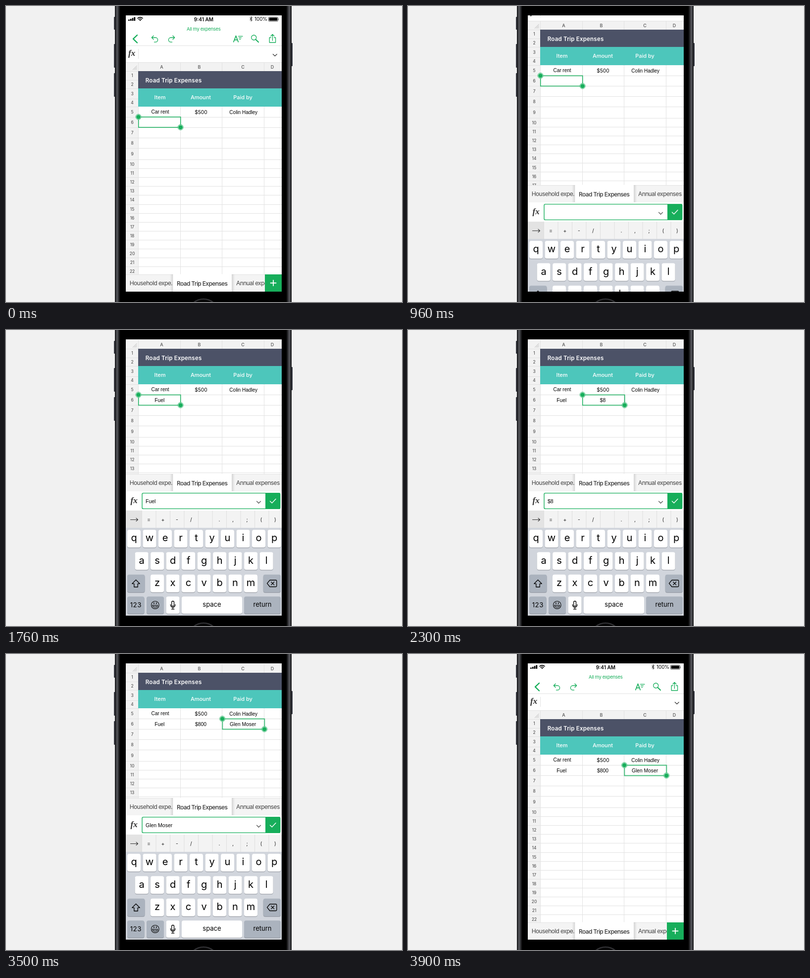
An HTML page for the animation above (4.48 s loop, 800 px wide and 600 px high).

```html
<!DOCTYPE html>
<html lang="en">
<head>
<meta charset="utf-8">
<title>Road Trip Expenses</title>
<style>
html, body { margin: 0; width: 100%; height: 100%; overflow: hidden; background: #f1f1f1; }
svg { display: block; width: 800px; height: 600px; font-family: Inter, sans-serif; }
.sans { font-family: "Liberation Sans", Arial, sans-serif; }
.fx { font: italic bold 17px "Liberation Serif", serif; fill: #333; }
.mid { text-anchor: middle; }
.line { fill: none; stroke-linecap: round; stroke-linejoin: round; }
.green { stroke: #17ae5b; }
.grid { stroke: #e2e2e2; }

/* One loop is 4480 ms; the curve is a plain smoothstep. */
#sheet, #keyboard, #bar, #tabs, #selY, #selX, #plus, #tap {
  animation: 4480ms cubic-bezier(.3333, 0, .6667, 1) infinite;
}
#sheet { animation-name: sheet; }
#selY { animation-name: selY; }
#selX { animation-name: selX; }
#tabs { animation-name: tabs; }
#keyboard { animation-name: keyboard; }
#bar { animation-name: bar; }
#plus { animation-name: plus; }
#tap { animation-name: tap; transform-box: fill-box; transform-origin: center; }

@keyframes sheet {
  0%, 16.07% { transform: translateY(0); }
  22.81%, 80.76% { transform: translateY(-94px); }
  87.05%, 100% { transform: translateY(0); }
}
@keyframes selY {
  0%, 16.07% { transform: translateY(0); }
  22.81%, 80.11% { transform: translateY(-93.5px); }
  86.81%, 100% { transform: translateY(.5px); }
}
@keyframes selX {
  0%, 40.63% { transform: translateX(0); }
  43.84%, 61.16% { transform: translateX(85px); }
  64.38%, 100% { transform: translateX(169.5px); }
}
@keyframes tabs {
  0%, 16.52% { transform: translateY(252px); }
  24.11%, 79.33% { transform: translateY(0); }
  86.03%, 100% { transform: translateY(252px); }
}
@keyframes keyboard {
  0%, 16.52% { transform: translateY(252px); }
  24.11%, 79.75% { transform: translateY(0); }
  86.45%, 100% { transform: translateY(252px); }
}
@keyframes bar {
  0%, 79.66% { transform: translateY(0); }
  86.36%, 100% { transform: translateY(252px); }
}
@keyframes plus {
  0%, 16.52% { opacity: 1; }
  20.5%, 83.5% { opacity: 0; }
  86.6%, 100% { opacity: 1; }
}
@keyframes tap {
  0%, 5.1% { transform: scale(.2); opacity: 0; }
  7.4% { transform: scale(.8); opacity: .22; }
  11.16%, 100% { transform: scale(1); opacity: 0; }
}
</style>
</head>
<body>
<svg viewBox="0 0 800 600">
  <defs>
    <clipPath id="screen"><rect x="242" y="19" width="315" height="560"/></clipPath>
    <linearGradient id="metal">
      <stop offset="0" stop-color="#0c0c0e"/>
      <stop offset=".15" stop-color="#2a2b2e"/>
      <stop offset=".4" stop-color="#58595e"/>
      <stop offset=".6" stop-color="#3a3b3f"/>
      <stop offset=".8" stop-color="#1b1b1d"/>
      <stop offset="1" stop-color="#000"/>
    </linearGradient>
    <linearGradient id="shade">
      <stop offset="0" stop-color="#000" stop-opacity="0"/>
      <stop offset="1" stop-color="#000" stop-opacity=".13"/>
    </linearGradient>
    <path id="chevron" class="line" d="M-4 -2 L0 2 L4 -2" stroke="#333" stroke-width="1.1"/>
  </defs>

  <rect width="800" height="600" fill="#f1f1f1"/>
  <g fill="#3a3c45">
    <rect x="218" y="22" width="4" height="26" rx="1"/>
    <rect x="218" y="77" width="4" height="48" rx="1"/>
    <rect x="218" y="136" width="4" height="48" rx="1"/>
    <rect x="575" y="75" width="4" height="47" rx="1"/>
  </g>
  <rect x="220" width="357" height="600"/>
  <rect id="edge" x="220" width="11" height="600" fill="url(#metal)"/>
  <use href="#edge" transform="translate(797) scale(-1 1)"/>
  <circle cx="399" cy="625" r="31" fill="#050505" stroke="#303033" stroke-width="2.5"/>

  <g clip-path="url(#screen)">
    <rect x="242" y="19" width="315" height="560" fill="#fff"/>

    <g id="sheet">
      <!-- status bar -->
      <path d="M247 27.5h2.8v2.5h-2.8z M250.8 26h2.8v4h-2.8z M254.6 24.3h2.8v5.7h-2.8z M258.4 22.5h2.8v7.5h-2.8z"/>
      <path class="line" d="M265.9 25 a7.3 7.3 0 0 1 10.2 0 M268 27.2 a4.3 4.3 0 0 1 6 0" stroke="#000" stroke-width="1.6"/>
      <path d="M271 30.6 l-1.8 -1.9 a2.6 2.6 0 0 1 3.6 0z"/>
      <text class="mid" x="399.3" y="30.6" font-size="10" font-weight="600">9:41 AM</text>
      <path class="line" d="M492.8 24 l4.6 4.5 -2.3 2.3 v-9.4 l2.3 2.3 -4.6 4.5" stroke="#000" stroke-width=".9"/>
      <text x="502" y="30.3" font-size="9.8">100%</text>
      <rect x="530.3" y="22.5" width="19.2" height="8.6" rx="2" fill="none" stroke="#000" stroke-width=".7"/>
      <rect x="531.6" y="23.8" width="16.6" height="6" rx="1"/>
      <path d="M550.3 25.2 q1.4 1.6 0 3.2z"/>

      <!-- toolbar -->
      <text class="mid" x="399.2" y="49.8" font-size="9.5" letter-spacing="-.3" fill="#17ae5b">All my expenses</text>
      <g class="line green" stroke-width="1.3">
        <path d="M265 59 L257 66.7 L265 74.5" stroke-width="2.4"/>
        <path id="undo" d="M298 60.3 L294.3 64 L298 67.7 M294.6 64 H302 a4.6 4.6 0 0 1 0 9.2 H299.5"/>
        <use href="#undo" transform="translate(635) scale(-1 1)"/>
        <path d="M459.8 72.8 L464.5 60.5 L469.2 72.8 M461.4 68.6 H467.6" stroke-width="1.7"/>
        <path d="M469.5 61.3 H478 M470.5 64.3 H475.5 M471.5 67.3 H474"/>
        <circle cx="500.7" cy="64" r="5"/>
        <path d="M504.6 68 L510 73.3" stroke-width="2"/>
        <path d="M535.2 64 H532.2 V74 H544.6 V64 H541.6 M538.4 70 V57.8 M535 61 L538.4 57.5 L541.8 61"/>
      </g>

      <!-- formula bar -->
      <path class="grid" d="M242 80.5 H557 M267.5 87 V107"/>
      <text class="fx" x="247" y="100.6">fx</text>
      <use href="#chevron" x="543.3" y="99.5"/>

      <g id="cells"></g>
    </g>

    <g id="selY"><g id="selX">
      <rect x="267.7" y="225" width="85" height="21" fill="none" class="green" stroke-width="1.5"/>
      <g id="knob">
        <circle cx="267.6" cy="224.8" r="5.5" fill="#fff" class="green" stroke-width=".9"/>
        <circle cx="267.6" cy="224.8" r="4.4" fill="#17ae5b"/>
      </g>
      <use href="#knob" x="85" y="21"/>
    </g></g>

    <circle id="tap" cx="390.5" cy="96" r="24.5" fill="#555"/>

    <g id="keyboard">
      <rect x="242" y="327" width="315" height="39" fill="#fff"/>
      <text class="fx" x="251.5" y="351">fx</text>
      <rect x="275" y="330.6" width="278.7" height="31.8" rx="2.5" fill="#fff" class="green" stroke-width="1.4"/>
      <path d="M524 330 h27.5 a2.5 2.5 0 0 1 2.5 2.5 v27.8 a2.5 2.5 0 0 1 -2.5 2.5 h-27.5z" fill="#17ae5b"/>
      <path class="line" d="M533.5 347 L537.3 350.7 L545 342.5" stroke="#fff" stroke-width="1.4"/>
      <use href="#chevron" x="510.5" y="349.2"/>
      <rect x="242" y="366" width="315" height="35" fill="#f3f3f3"/>
      <rect x="242" y="366" width="32.5" height="35" fill="#e3e3e3"/>
      <path class="line" d="M251.5 384.5 H266.5 M263 381.3 L266.5 384.5 L263 387.7" stroke="#333" stroke-width="1.1"/>
      <rect x="242" y="401" width="315" height="178" fill="#d1d5dc"/>
      <g id="keys"></g>
      <g class="line" stroke="#000" stroke-width="1.3">
        <path d="M262.5 506.5 L254.8 514.3 H258.8 V521 H266.2 V514.3 H270.2z"/>
        <path d="M533 507 H545 a1.8 1.8 0 0 1 1.8 1.8 V518.7 a1.8 1.8 0 0 1 -1.8 1.8 H533 L527.5 513.7z M535.8 510.8 l5.8 5.8 M541.6 510.8 l-5.8 5.8"/>
        <circle cx="301.3" cy="557.5" r="7.8" stroke-width="1.1"/>
        <path d="M296 557.8 H306.6 a5.3 5.3 0 0 1 -10.6 0z M297 560 H305.6" stroke-width=".9"/>
        <path d="M298.9 553.2 v1.2 M303.7 553.2 v1.2" stroke-width="1.7"/>
        <rect x="334.7" y="549.5" width="4.8" height="10.5" rx="2.4"/>
        <path d="M332.3 556.5 a4.8 5.6 0 0 0 9.6 0 M337.1 562.3 V565.6 M334.3 565.8 H339.9"/>
      </g>
    </g>

    <g id="tabs">
      <rect x="242" y="292" width="315" height="35" fill="#f4f4f4"/>
      <path d="M242 292.5 H557" stroke="#e3e3e3"/>
      <rect x="331" y="292" width="6.5" height="35" fill="url(#shade)"/>
      <rect x="331" y="292" width="6.5" height="35" fill="url(#shade)" transform="translate(793.5) scale(-1 1)"/>
      <rect x="337.5" y="291.5" width="118.5" height="35.5" fill="#fff"/>
      <g font-size="12" letter-spacing="-.62" fill="#444">
        <text x="249.7" y="314.3">Household expe.</text>
        <text x="345" y="314.5" font-weight="500" fill="#333">Road Trip Expenses</text>
        <text x="465" y="314.3">Annual expenses</text>
      </g>
    </g>

    <text id="bar" class="sans" x="282" y="350.5" font-size="10.5" xml:space="preserve"></text>

    <g id="plus">
      <rect x="523" y="544" width="34" height="35" fill="#17ae5b"/>
      <path class="line" d="M534.5 561.5 H545.5 M540 556 V567" stroke="#fff" stroke-width="1.8"/>
    </g>
  </g>
</svg>

<script>
const $ = id => document.getElementById(id);
const rect = (x, y, w, h, fill, rx = 0) =>
  `<rect x="${x}" y="${y}" width="${w}" height="${h}" rx="${rx}" fill="${fill}"/>`;
const label = (x, y, text, size, more = '') =>
  `<text class="mid" x="${x}" y="${y + size * .36}" font-size="${size}" ${more}>${text}</text>`;

const entries = [
  { text: 'Fuel', x: 310.2, from: 1300, step: 100, until: 1820 },
  { text: '$800', x: 393.5, from: 2080, step: 120, until: 2740 },
  { text: 'Glen Moser', x: 478.5, from: 2930, step: 48, until: 4480 }
];

function drawCells() {
  const edges = [132, 150, 167, 188, 204, 225, 246.5, 267.5, 288.5, 311.5];
  for (let i = 1; i < 16; i++) edges.push(Math.floor(311.5 + 18.1 * i) + .5);
  let out = rect(242, 114, 315, 18, '#f2f2f2') + rect(242, 132, 25, 460, '#f2f2f2');
  let lines = 'M242 114.5H557M242 132.5H557';
  edges.forEach((y, i) => {
    lines += `M242 ${Math.floor(y) + .5}H${i < 5 ? 267 : 557}`;
    if (i < edges.length - 1) {
      out += label(255, (y + edges[i + 1]) / 2 + .3, i + 1, 8.3, 'font-weight="500" fill="#555"');
    }
  });
  for (const x of [267.5, 352.5, 436.5, 521.5]) lines += `M${x} 114V592`;
  out += `<path class="grid" d="${lines}"/>`;
  out += '<path d="M256 129.5L264.5 121M259 129.5L264.5 124M262 129.5L264.5 127" stroke="#bbb"/>';
  [314.5, 390.5, 478.5, 538].forEach((x, i) => {
    out += label(x, 123.3, 'ABCD'[i], 9, 'font-weight="500" fill="#555"');
  });
  out += rect(267, 132, 290, 35, '#4c5267') + rect(267, 167, 290, 37, '#4dc6bb');
  out += label(338.6, 150.6, 'Road Trip Expenses', 11.5, 'font-weight="600" letter-spacing=".22" fill="#fff"');
  [['Item', 311], ['Amount', 393.5], ['Paid by', 478.5]].forEach(([text, x]) => {
    out += label(x, 185, text, 11, 'font-weight="500" fill="#fff"');
  });
  const sans = 'font-family="Liberation Sans, Arial, sans-serif"';
  out += label(311.5, 214.8, 'Car rent', 10, sans);
  out += label(394, 215, '$500', 10.2);
  out += label(479.7, 215, 'Colin Hadley', 10, sans);
  entries.forEach((e, i) => {
    out += label(e.x, 235.8, '', 10.3, `${sans} id="cell${i}" xml:space="preserve"`);
  });
  $('cells').innerHTML = out;
}

function drawKeys() {
  let out = '';
  const key = (x, y, w, text = '', size = 20, fill = '#fff', lift = 2, more = '') => {
    const h = y > 535 ? 35 : 36;
    out += rect(x, y + 1, w, h, '#8e939b', 4) + rect(x, y, w, h, fill, 4);
    if (text) out += label(x + w / 2, y + h / 2 - lift, text, size, more);
  };
  const grey = '#abb3be';
  [['qwertyuiop', 245, 405], ['asdfghjkl', 260.6, 450.3], ['zxcvbnm', 292, 495.7]].forEach(([row, x, y]) =>
    [...row].forEach((c, i) => key(x + 31.5 * i, y, 27, c)));
  key(245, 495.7, 35.5, '', 0, grey);
  key(519.7, 495.7, 35.3, '', 0, grey);
  key(245, 540.3, 34.5, '123', 13.3, grey, .3, 'letter-spacing=".5"');
  key(284, 540.3, 35, '', 0, grey);
  key(323.5, 540.3, 27);
  key(355, 540.3, 122, 'space', 13, '#fff', 1.2);
  key(481, 540.3, 74, 'return', 13, grey, 1);

  [...'=+-/ .,;()'].forEach((c, i) => {
    const x = 274.5 + 28.5 * i;
    out += `<path d="M${x} 366V401" stroke="#dedede"/>`;
    out += label(x + (i > 5 ? 13 : 14), 384, c, 10.5, 'fill="#222"');
  });
  $('keys').innerHTML = out;
}

drawCells();
drawKeys();

const start = performance.now();
function type() {
  const t = (performance.now() - start) % 4480;
  let bar = '';
  entries.forEach((e, i) => {
    const count = Math.max(0, Math.floor((t - e.from) / e.step) + 1);
    const typed = e.text.slice(0, count);
    $('cell' + i).textContent = typed;
    if (t < e.until) bar += typed;
  });
  // The cells keep earlier entries; the bar shows only the one being typed.
  $('bar').textContent = bar;
  requestAnimationFrame(type);
}
type();
</script>
</body>
</html>
```
